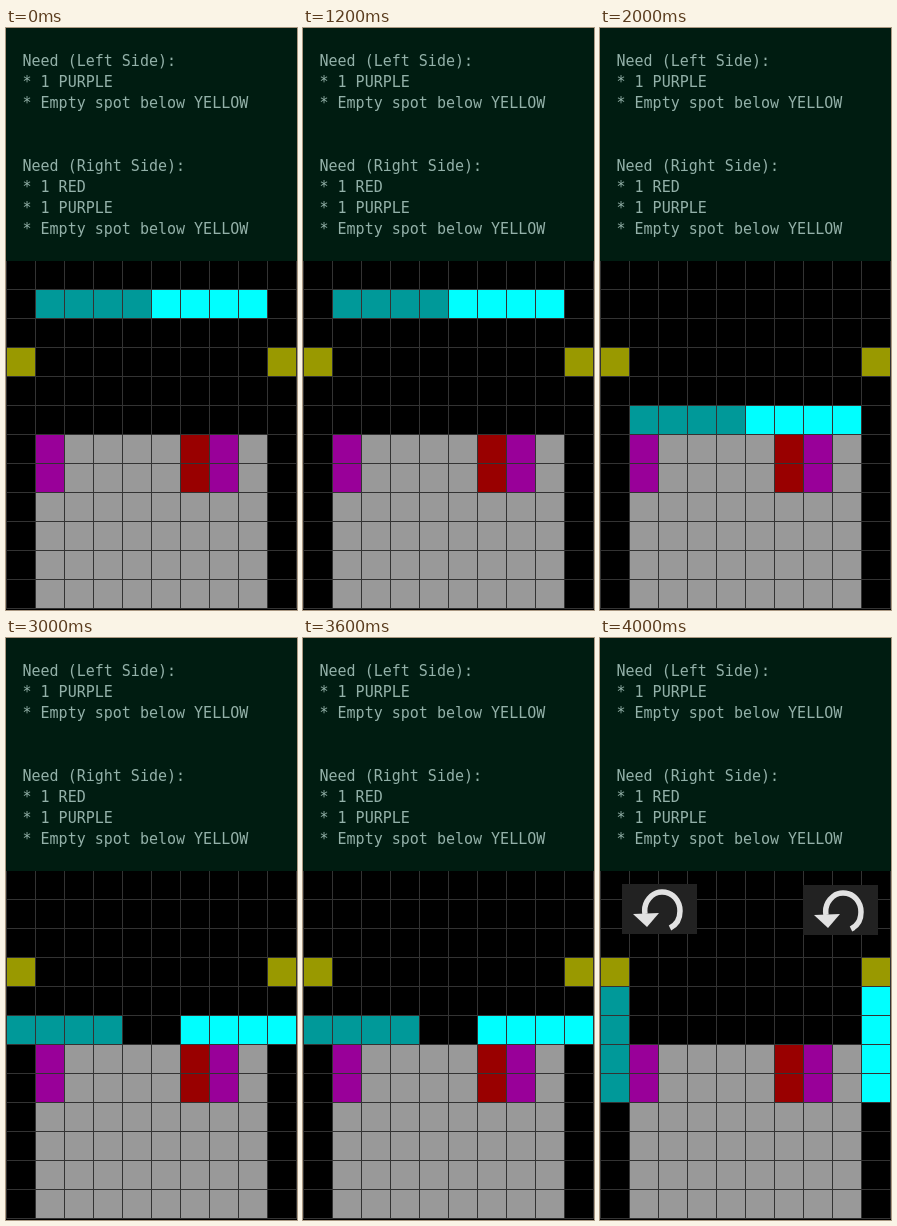
An HTML page for the animation above (5 s loop, 291 by 582 pixels).

```html
<!DOCTYPE html>
<html lang="en">
<head>
<meta charset="utf-8">
<title>Falling block setup</title>
<style>
html, body { margin: 0; width: 100%; height: 100%; overflow: hidden; background: #000; }
svg { display: block; width: 291px; height: 582px; }
text { font: 15px "DejaVu Sans Mono", monospace; fill: #93b1a9; white-space: pre; }
</style>
</head>
<body>
<svg viewBox="0 0 291 582">
  <defs>
    <g id="undo">
      <rect width="75" height="50" fill="#222"/>
      <path d="M23 30 C21 18 30 8 40 8 C51 8 58 17 58 27 C58 35 54 41 48 44" fill="none" stroke="#e2e2e2" stroke-width="5.5"/>
      <path d="M11 30 L37 29 L25 43 Z" fill="#e2e2e2"/>
    </g>
  </defs>
  <rect width="291" height="582"/>
  <g id="field"></g>
  <g id="pieces"></g>
  <path id="grid" fill="none" stroke="#333"/>
  <rect width="291" height="233" fill="#001c11"/>
  <g id="notes"></g>
  <g id="turns">
    <use href="#undo" x="22" y="246"/>
    <use href="#undo" x="203" y="247"/>
  </g>
</svg>
<script>
const CELL = 29, TOP = 232, COLS = 10, ROWS = 12, LOOP = 5000;
const NS = "http://www.w3.org/2000/svg";
const byId = id => document.getElementById(id);

function add(parent, tag, attrs) {
  const node = document.createElementNS(NS, tag);
  for (const key in attrs) node.setAttribute(key, attrs[key]);
  return parent.appendChild(node);
}

// Places a block of whole cells on the board.
function place(node, col, row, cols, rows) {
  node.setAttribute("x", col * CELL);
  node.setAttribute("y", TOP + row * CELL);
  node.setAttribute("width", cols * CELL);
  node.setAttribute("height", rows * CELL);
}

function block(parent, fill, ...cells) {
  const node = add(parent, "rect", { fill });
  if (cells.length) place(node, ...cells);
  return node;
}

const field = byId("field");
block(field, "#999", 1, 6, 8, 6);
block(field, "#909", 1, 6, 1, 2);
block(field, "#900", 6, 6, 1, 2);
block(field, "#909", 7, 6, 1, 2);
block(field, "#990", 0, 3, 1, 1);
block(field, "#990", 9, 3, 1, 1);

let lines = "";
for (let c = 0; c <= COLS; c++) lines += `M${c * CELL + 0.5} ${TOP}V581`;
for (let r = 0; r <= ROWS; r++) lines += `M0 ${TOP + r * CELL + 0.5}H291`;
byId("grid").setAttribute("d", lines);

const notes = [
  "Need (Left Side):", "* 1 PURPLE", "* Empty spot below YELLOW", "", "",
  "Need (Right Side):", "* 1 RED", "* 1 PURPLE", "* Empty spot below YELLOW"
];
notes.forEach((line, i) => {
  add(byId("notes"), "text", { x: 16.5, y: 38 + i * 21 }).textContent = line;
});

const left = block(byId("pieces"), "#099");
const right = block(byId("pieces"), "#0ff");

// Each pose: start time, then col, row, cols, rows for both pieces.
const poses = [
  { at: 0, left: [1, 1, 4, 1], right: [5, 1, 4, 1] },
  { at: 2000, left: [1, 5, 4, 1], right: [5, 5, 4, 1] },
  { at: 3000, left: [0, 5, 4, 1], right: [6, 5, 4, 1] },
  { at: 4000, left: [0, 4, 1, 4], right: [9, 4, 1, 4], turned: true }
];

function draw(ms) {
  const pose = poses.filter(p => p.at <= ms).pop();
  place(left, ...pose.left);
  place(right, ...pose.right);
  byId("turns").setAttribute("visibility", pose.turned ? "visible" : "hidden");
}

const start = performance.now();
function tick() {
  draw((performance.now() - start) % LOOP);
  requestAnimationFrame(tick);
}
tick();
</script>
</body>
</html>
```
